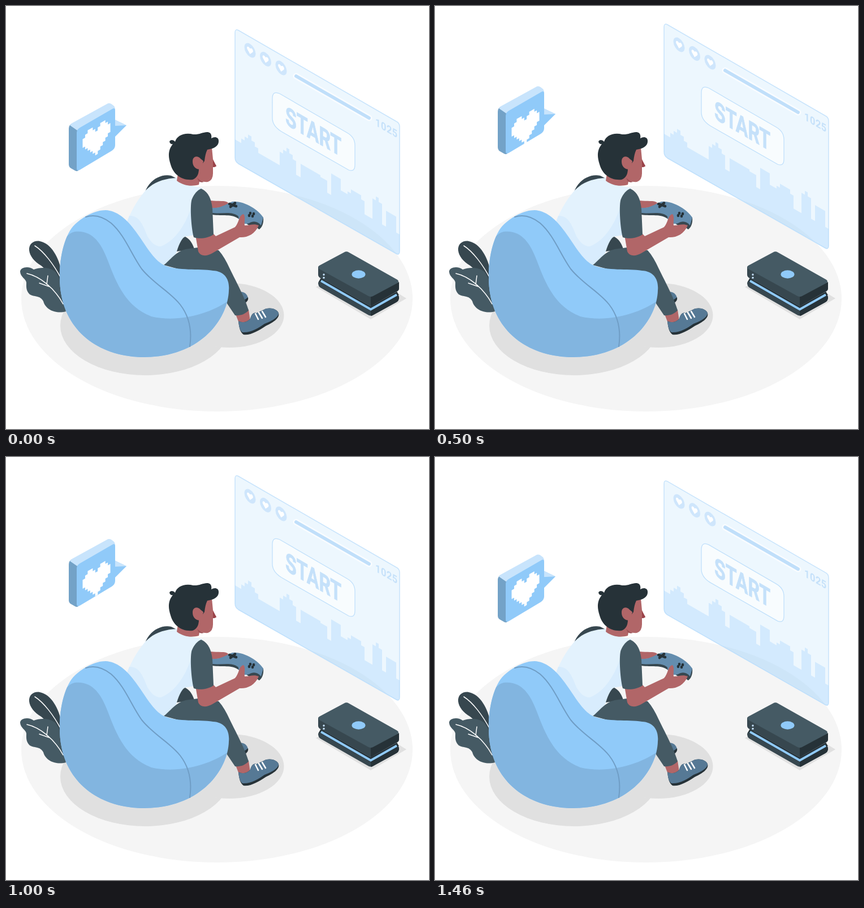
These frames come from a looping animation (748x748 px, 1.5 s). An HTML page:

```html
<!DOCTYPE html>
<html lang="en">
<head>
<meta charset="utf-8">
<title>Start</title>
<style>
html, body { margin: 0; width: 100%; height: 100%; overflow: hidden; background: #fff; }
svg { display: block; width: 100%; height: 100%; }
text { font-family: Roboto, sans-serif; font-weight: 700; fill: #c5e1fa; }
.line { fill: none; stroke-linecap: round; }
</style>
</head>
<body>
<svg viewBox="0 0 748 748">
  <defs>
    <path id="bagShape" d="M176 361C196 362 212 376 225 393C245 418 258 447 279 458C305 469 340 464 366 468C387 469 396 484 394 503C393 550 348 620 245 621C160 621 96 570 95 482C94 445 104 403 122 386C137 372 158 361 176 361Z"/>
    <path id="screenShape" d="M405 47Q405 40 411 43L690 204Q696 207 696 213V434Q696 441 690 438L411 279Q405 275 405 268Z"/>
    <clipPath id="bagClip"><use href="#bagShape"/></clipPath>
    <clipPath id="screenClip"><use href="#screenShape"/></clipPath>
    <g id="life">
      <circle r="11.5" fill="#cfe6fc"/>
      <path d="M0 6.5L-5.5 .5C-8 -3 -3.5 -7.5 0 -3C3.5 -7.5 8 -3 5.5 .5Z" fill="#fff"/>
    </g>
  </defs>

  <ellipse cx="373" cy="517.5" rx="346" ry="199.5" fill="#f5f5f5"/>
  <g fill="#e0e0e0">
    <ellipse cx="246" cy="565" rx="150" ry="88"/>
    <ellipse cx="395" cy="547" rx="96.5" ry="57"/>
    <path d="M548 497L645 554L708 517L690 506L600 470Z"/>
  </g>

  <g id="console">
    <path d="M552 490Q553 484 559 486L645 534L690 508Q695 511 695 516Q695 521 690 524L650 546Q645 549 640 546L556 498Q552 495 552 490Z" fill="#37474f"/>
    <path d="M645 536L690 510Q695 511 695 516Q695 521 690 524L650 546Q647 548 645 548Z" fill="#263238"/>
    <path d="M555 484L645 535L693 508" fill="none" stroke="#263238" stroke-width="7"/>
    <path d="M557 486L645 536.5L691 510.5" fill="none" stroke="#90caf9" stroke-width="4"/>
    <path d="M552 461L602 440L645 513V531Q643 531 641 529L556 481Q552 479 552 475Z" fill="#37474f"/>
    <path d="M645 510L695 488V500Q695 503 691 505L649 529Q647 531 645 531Z" fill="#263238"/>
    <path d="M554 459L598 435.5Q602 433 606 435.5L692 484Q696 487 692 490L649 513Q645 515 641 513L554 465Q550 462 554 459Z" fill="#455a64"/>
    <ellipse cx="623.5" cy="474.5" rx="12" ry="7.2" fill="#90caf9"/>
    <g fill="#c8e4fc"><circle cx="562" cy="475" r="1.7"/><circle cx="562" cy="480.5" r="1.7"/></g>
  </g>

  <g id="screen">
    <use href="#screenShape" fill="#90caf9" fill-opacity=".16" stroke="#c8e4fc" stroke-width="1.5"/>
    <g clip-path="url(#screenClip)"><path id="city" transform="matrix(1 .577 0 1 405 0)" fill="#90caf9" fill-opacity=".28"/></g>
    <g id="lives"></g>
    <path class="line" d="M513 124L642 198" stroke="#f9fcff" stroke-width="11"/>
    <path class="line" d="M513 124L642 198" stroke="#c0dffa" stroke-width="6"/>
    <path d="M471 164Q471 149 484 155L603 224Q617 232 617 246V281Q617 294 606 290L487 222Q471 212 471 198Z" fill="#fff" fill-opacity=".62" stroke="#c0e0fb" stroke-width="1.3"/>
    <text transform="matrix(.7 .408 0 1 494 209)" font-size="46" stroke="#c5e1fa" stroke-width=".8">START</text>
    <text transform="matrix(.866 .5 0 1 653 211)" font-size="19" letter-spacing=".6">1025</text>
  </g>

  <g id="tail">
    <path d="M190 200L213 211L190 234Z" fill="#90caf9"/>
    <path d="M190 200L213 211L190 212Z" fill="#c8e4fc"/>
  </g>
  <g id="bubble">
    <path d="M111 217Q111 211 116 208L130 213L128 291Q125 293 122 291L115 287Q111 285 111 280Z" fill="#73a2c7"/>
    <path d="M113 211Q114 209 117 207L178 173.5Q182 171 186 173L190 176Q193 178 193 184L126 220Z" fill="#c8e4fc"/>
    <path d="M125 224Q125 218.5 130 215.5L188 182Q193 179 193 185V246Q193 252 187 256L131 289.5Q125 293 125 287Z" fill="#90caf9"/>
  </g>
  <g id="heart"><path id="pixels" transform="matrix(4.45 -2.57 0 5.2 135.5 225)" fill="#fff"/></g>

  <g id="plant">
    <path d="M41 432C40 420 50 414 60 416C80 420 94 445 98 470V490C85 480 75 470 62 459C50 452 42 442 41 432Z" fill="#37474f"/>
    <path d="M25 470C25 462 40 459 49 466C62 461 80 462 88 471C92 477 96 484 98 490L106 540C90 545 70 538 66 522C60 511 50 515 42 510C35 503 36 497 36 489C35 482 26 480 25 470Z" fill="#455a64"/>
    <path class="line" d="M51 424C67 434 85 458 97 481M37 473C60 478 86 499 101 527M74 477L72 492M59 490L76 496" stroke="#fff" stroke-width="1.5"/>
  </g>

  <g id="torso">
    <path d="M246 329C252 310 272 296 292 300L304 306C280 305 264 314 246 329Z" fill="#37474f"/>
    <path d="M213 384C224 355 237 337 248 325C262 311 280 305 302 304C315 316 330 318 348 322L332 405L315 408L303 432C297 446 290 454 279 458C258 447 245 418 225 393Z" fill="#e3f2fd"/>
    <path d="M218 371C235 370 242 386 250 407C258 421 266 425 274 425C300 415 318 385 327 357L332 405L315 408L303 432C297 446 290 454 279 458C258 447 245 418 225 393L213 384Z" fill="#d8ecfd"/>
  </g>

  <g id="legs">
    <path d="M400 512L412 506C420 504 427 509 428 517L410 530Z" fill="#567995"/>
    <path d="M428 515C430 523 421 526 412 533L408 528C416 524 422 520 428 515Z" fill="#263238"/>
    <path d="M302 434C306 420 312 409 317 408C325 412 330 420 333 430Z" fill="#37474f"/>
    <path d="M406 545L429 537L432 557C427 563 416 563 411 558Z" fill="#b16668"/>
    <path d="M279 458C290 450 300 434 318 430L340 427L376 432C384 441 390 452 395 463C404 482 421 512 429 538C423 545 414 548 405 547L360 480L330 472Z" fill="#455a64"/>
    <path d="M411 557C418 561 427 559 432 553C434 545 438 541 443 543L456 537C465 532 479 535 482 543C485 553 469 561 459 566C447 574 432 583 420 581C414 577 412 568 411 557Z" fill="#263238"/>
    <path d="M411 557C418 561 427 559 432 553C434 545 438 541 443 543L456 537C465 532 479 535 482 543C482 551 468 558 457 562C446 570 433 578 418 577C413 573 412 566 411 557Z" fill="#567995"/>
    <path class="line" d="M441 544L446 554M447 542L453 552M453 540L459 550" stroke="#fff" stroke-width="2.5"/>
  </g>

  <use href="#bagShape" fill="#90caf9"/>
  <path clip-path="url(#bagClip)" d="M90 440C100 415 108 402 122 399C152 396 168 418 180 450C195 490 212 532 257 549C305 560 360 545 395 520V640H80Z" fill="#82b5e0"/>
  <path class="line" d="M141 373C160 367 176 376 186 384C210 405 222 440 240 465C262 492 290 505 308 528C325 550 329 575 325 602" stroke="#6f9dc5" stroke-width="2"/>

  <g id="head">
    <path d="M304 296L302 309C315 319 330 319 341 316L344 300Z" fill="#b16668"/>
    <path d="M335 250L364 250L366 271Q369 278 372 283Q370 285 366 285V296Q366 308 357 311Q346 312 338 305Z" fill="#b16668"/>
    <path d="M338 304Q343 309 350 311Q345 313 341 310Z" fill="#9a5054"/>
    <path d="M366 272L372 283Q370 285 366 285Z" fill="#9a4349"/>
    <path d="M289 240C290 236 296 236 299 240C302 229 316 223 331 227C341 228 350 222 357 223C363 224 364 229 363 234C369 230 376 232 376 238C377 247 368 253 356 254C353 260 352 266 351 274L341 288C341 297 338 304 330 307C311 309 296 298 291 280C286 265 287 254 295 244C292 245 290 243 289 240Z" fill="#263238"/>
    <path d="M330 275C330 265 339 264 344 270L349 274L346 288C338 291 330 285 330 275Z" fill="#b16668"/>
  </g>

  <g id="pad">
    <path d="M362 344C375 346 388 343 393 348L390 355L373 357L363 357Z" fill="#b16668"/>
    <path d="M365 357V369C384 372 398 367 411 376L430 388C440 384 443 393 448 395C453 391 456 384 455 374L430 360Z" fill="#37474f"/>
    <path d="M365 357C380 358 389 350 400 346C421 344 446 360 455 374L451 388C444 380 437 380 430 384C419 388 411 382 411 372C400 362 382 368 365 366Z" fill="#648dae"/>
    <path class="line" d="M395 350L407 354M405 348.500L397 355" stroke="#263238" stroke-width="4.500"/>
    <path class="line" d="M432 366v1M438 367v1M430 370v1M436 371v1" stroke="#263238" stroke-width="4.500"/>
  </g>

  <g id="arm">
    <path d="M335 405L340 434C344 443 355 443 365 437L413 409C426 410 440 404 447 388C439 384 430 388 422 388C421 380 424 372 420 368C412 369 412 384 405 391L371 407L364 400Z" fill="#b16668"/>
    <path d="M345 323C356 328 363 338 365 358L367 404C355 412 340 412 332 409C327 390 325 349 329 341C333 332 338 326 345 323Z" fill="#455a64"/>
  </g>
</svg>
<script>
const byId = id => document.getElementById(id);
const rect = (x, y, w, h) => `M${x} ${y}h${w}v${h}h${-w}z`;

// A tower narrows towards its roof by the same inset on each storey.
function tower(x, width, top, storeys) {
  let path = "";
  for (let i = 0; i < storeys; i++) {
    const inset = 6 * (storeys - 1 - i);
    path += rect(x + inset, top + 7 * i, width - 2 * inset, 300 - top - 7 * i);
  }
  return path;
}
byId("city").setAttribute("d", rect(0, 236, 292, 64) +
  tower(11, 30, 214, 3) + tower(79, 29, 198, 3) + tower(116, 35, 212, 1) +
  tower(151, 12, 215, 1) + tower(170, 17, 198, 1) + tower(187, 12, 218, 1) +
  tower(199, 30, 206, 2) + tower(243, 17, 193, 2) + tower(267, 18, 208, 1));

// Pixel heart: two lobes above a point, mirrored about the middle column.
let pixels = "";
for (let col = 0; col < 11; col++) {
  const side = Math.abs(col - 5);
  const top = Math.floor(Math.abs(side - 2.5));
  pixels += rect(col, top, 1.02, 10 - side - top);
}
byId("pixels").setAttribute("d", pixels);

byId("lives").innerHTML = [0, 1, 2].map(i =>
  `<use href="#life" transform="matrix(.866 .5 0 1 ${431.5 + 27.5 * i} ${78.5 + 15.5 * i})"/>`).join("");

const LOOP = 1500, STEPS = 36, HALF = STEPS / 2;
const TOP = 17.4; // step at which everything is highest
const travel = { bubble: 45, heart: 30, tail: 30, screen: 15 };

function draw(time) {
  const step = Math.floor((time % LOOP + 4) / (LOOP / STEPS)) % STEPS;
  const away = Math.abs(step - TOP);
  const lift = 1 - Math.min(away, STEPS - away) / HALF;
  for (const id in travel) {
    const y = travel[id] * (1 / 30 - lift);
    byId(id).setAttribute("transform", `translate(0 ${y.toFixed(2)})`);
  }
}

const start = performance.now();
function tick() {
  draw(performance.now() - start);
  requestAnimationFrame(tick);
}
tick();
</script>
</body>
</html>
```
